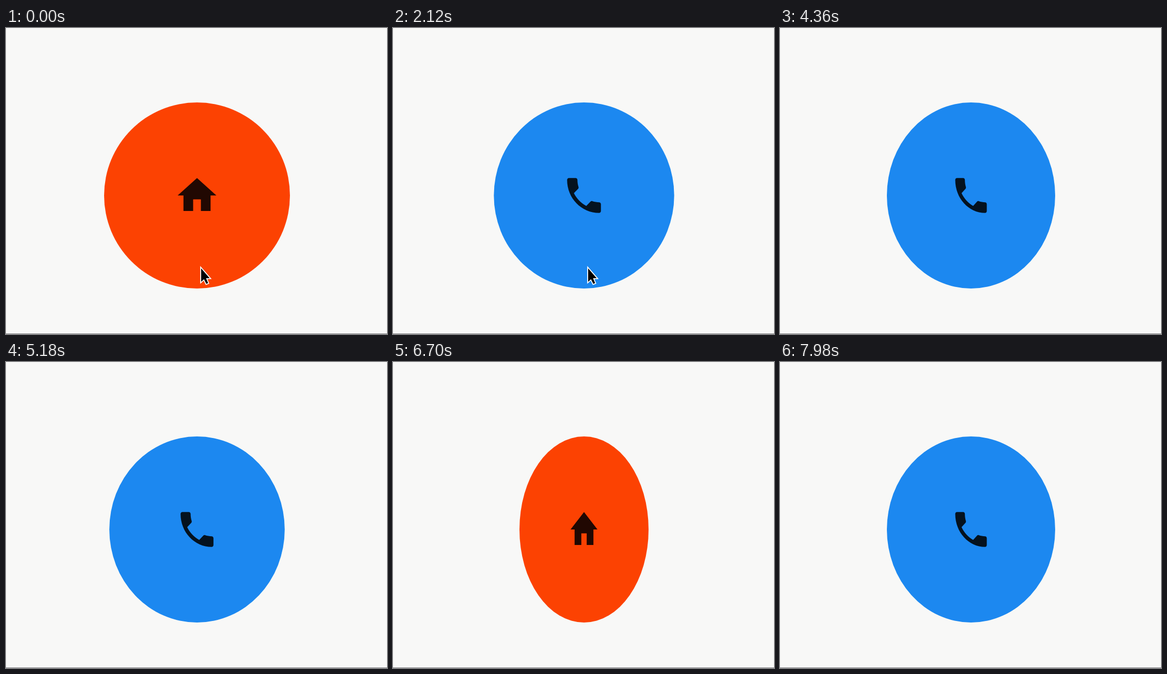
Recreate the animation shown at these times as an HTML page. Size 738x592 px, loop 8 s.

```html
<!DOCTYPE html>
<html lang="en">
<head>
<meta charset="utf-8">
<title>Flipping disc</title>
<style>
  html, body { margin: 0; width: 100%; height: 100%; overflow: hidden; background: #f8f8f7; }
  svg { display: block; width: 738px; height: 592px; }
</style>
</head>
<body>
<svg viewBox="0 0 738 592">
  <rect width="738" height="592" fill="#f8f8f7"/>
  <rect y="591" width="738" height="1" fill="#77777a"/>
  <g id="disc">
    <circle id="face" r="180"/>
    <path id="icon" transform="translate(-45 -45) scale(3.75)"/>
  </g>
  <path id="cursor" d="M378 465V491L383.5 486L388 495L391.5 493.5L387.5 484H394.5Z"
    fill="#000" stroke="#fff" stroke-width="3.6" paint-order="stroke"/>
</svg>
<script>
const LOOP = 8000, PERIOD = 66, CURSOR_END = 2500;
const $ = id => document.getElementById(id);
const disc = $('disc'), face = $('face'), icon = $('icon'), cursor = $('cursor');

const front = { fill: '#fc4202', ink: '#210802', d: 'M10 20v-6h4v6h5v-8h3L12 3 2 12h3v8z' };
const back = { fill: '#1c88f0', ink: '#04121f',
  d: 'M6.62 10.79c1.44 2.83 3.76 5.14 6.59 6.59l2.2-2.2c.27-.27.67-.36 1.02-.24 ' +
     '1.12.37 2.33.57 3.57.57.55 0 1 .45 1 1V20c0 .55-.45 1-1 1-9.39 0-17-7.61-17-17 ' +
     '0-.55.45-1 1-1h3.5c.55 0 1 .45 1 1 0 1.25.2 2.45.57 3.57.11.35.03.74-.25 1.02l-2.2 2.2z' };

// Flip curve with overshoot: step, degrees, slope
const curve = [[0, 0, -1], [6.5, 2, 5], [10.5, 46, 15], [20.5, 194, 6], [27.5, 205.1, -2.5], [33, 180, -5.5]];

function angleAt(u) {
  let i = 0;
  while (i < curve.length - 2 && u > curve[i + 1][0]) i++;
  const [x0, y0, m0] = curve[i], [x1, y1, m1] = curve[i + 1];
  const h = x1 - x0, s = (u - x0) / h, r = 1 - s;
  return r * r * ((1 + 2 * s) * y0 + s * h * m0) + s * s * ((3 - 2 * s) * y1 - r * h * m1);
}

// Steps last 20, 20 and 100 ms in turn
function stepAt(t) {
  const k = t + 20;
  return 3 * Math.floor(k / 140) + Math.min(2, Math.floor(k % 140 / 20)) - 1;
}

function draw(t) {
  const m = (stepAt(t) - 0.5 + PERIOD) % PERIOD;
  const c = Math.cos(angleAt(Math.min(m, PERIOD - m)) * Math.PI / 180);
  const side = c > 0 ? front : back;
  disc.setAttribute('transform', `translate(370 324) scale(${Math.max(Math.abs(c), 0.004)} 1)`);
  face.setAttribute('fill', side.fill);
  icon.setAttribute('fill', side.ink);
  icon.setAttribute('d', side.d);
  cursor.setAttribute('visibility', t < CURSOR_END ? 'visible' : 'hidden');
}

const start = performance.now();
function tick() {
  draw((performance.now() - start) % LOOP);
  requestAnimationFrame(tick);
}
tick();
</script>
</body>
</html>
```
